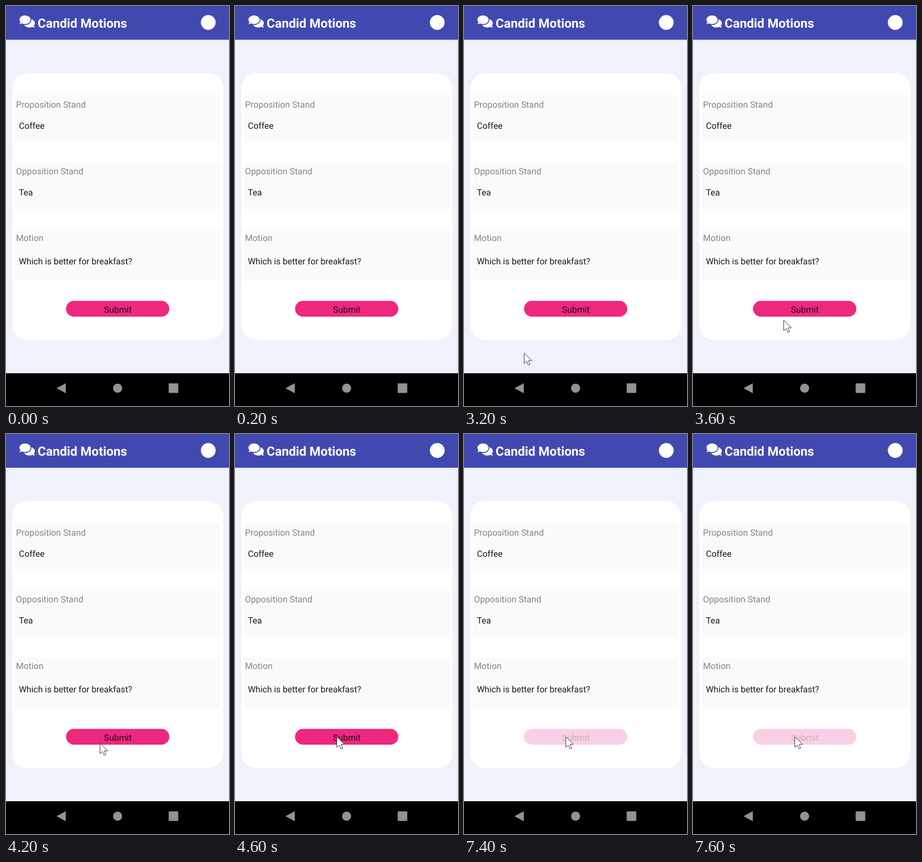
An HTML page with a canvas that plays this animation: 402 by 720 pixels, repeating every 8 s.

```html
<!DOCTYPE html>
<html lang="en">
<head>
<meta charset="utf-8">
<title>Debate form</title>
<style>
  html, body { margin: 0; width: 100%; height: 100%; overflow: hidden; background: #f0f2fb; }
  canvas { display: block; width: 402px; height: 720px; }
</style>
</head>
<body>
<canvas id="stage"></canvas>
<script>
const W = 402, H = 720, LOOP = 8000, PRESS = 7400;
const canvas = document.getElementById('stage');
const ctx = canvas.getContext('2d');
const dpr = window.devicePixelRatio || 1;
canvas.width = W * dpr;
canvas.height = H * dpr;

// Pointer positions: [start ms, x, y], each held until the next
const pointer = [
  [2800, 163, 673], [3000, 112, 658], [3200, 108, 624], [3400, 136, 592],
  [3600, 163, 565], [4000, 175, 559], [4200, 169, 556], [4400, 182, 546],
  [4600, 183, 544.5]
];

const fields = [
  { top: 160, height: 86, label: 'Proposition Stand', labelY: 183.3, value: 'Coffee', valueY: 221 },
  { top: 282, height: 84, label: 'Opposition Stand', labelY: 303.3, value: 'Tea', valueY: 341 },
  { top: 402, height: 92, label: 'Motion', labelY: 423.3, value: 'Which is better for breakfast?', valueY: 465 }
];

function rect(x, y, w, h, color, r = 0) {
  ctx.fillStyle = color;
  ctx.beginPath();
  ctx.roundRect(x, y, w, h, r);
  ctx.fill();
}

function disc(x, y, r, color) {
  ctx.fillStyle = color;
  ctx.beginPath();
  ctx.arc(x, y, r, 0, Math.PI * 2);
  ctx.fill();
}

function poly(points, color) {
  ctx.fillStyle = color;
  ctx.beginPath();
  points.forEach(([x, y]) => ctx.lineTo(x, y));
  ctx.closePath();
  ctx.fill();
}

function text(str, x, y, color, size, weight = 400, align = 'left') {
  ctx.font = `${weight} ${size}px Roboto, sans-serif`;
  ctx.textRendering = 'geometricPrecision';
  ctx.textAlign = align;
  ctx.fillStyle = color;
  ctx.fillText(str, x, y);
}

// Speech bubble with its tail at the left, or at the right when side is -1
function bubble(x, y, side) {
  ctx.save();
  ctx.translate(x, y);
  ctx.scale(side, 1);
  ctx.fillStyle = '#fff';
  ctx.beginPath();
  ctx.ellipse(0, 0, 10.1, 7.8, 0, 0, Math.PI * 2);
  ctx.fill();
  ctx.beginPath();
  ctx.moveTo(-8.2, 4.4);
  ctx.quadraticCurveTo(-8.9, 6, -10, 7.1);
  ctx.quadraticCurveTo(-10.1, 7.8, -9.7, 7.8);
  ctx.quadraticCurveTo(-7.4, 7.7, -5.4, 6.5);
  ctx.fill();
  ctx.restore();
}

function drawHeader() {
  const blue = '#4149b1';
  rect(0, 0, W, 60.8, blue);
  bubble(42, 31, -1);
  ctx.fillStyle = blue;
  ctx.beginPath();
  ctx.ellipse(34.3, 24.8, 11.6, 9.3, 0, 0, Math.PI * 2);
  ctx.fill();
  bubble(34.3, 24.8, 1);
  text('Candid Motions', 57, 39, '#fff', 22.8, 700);
  disc(364.6, 29.6, 13.3, '#fff');
}

function drawForm(pressed) {
  rect(11.5, 121, 380, 480, '#fff', 26);
  for (const f of fields) {
    rect(16, f.top, 370.5, f.height, '#fafafa', 2);
    text(f.label, 18, f.labelY, '#858585', 15.85);
    text(f.value, 23.2, f.valueY, '#1c1c1c', 15.65);
  }
  rect(108.2, 530.8, 186.2, 28.4, pressed ? '#f9d0e3' : '#ee287e', 14.2);
  text('Submit', 201.6, 551.7, pressed ? '#c6b0bc' : '#200a14', 15.85, 400, 'center');
}

function drawNav() {
  const grey = '#939393';
  rect(0, 661, W, 59, '#000');
  poly([[91, 688], [107.8, 679], [107.8, 697]], grey);
  disc(201.2, 688, 8.2, grey);
  rect(293.3, 679.3, 17.2, 17.2, grey, 1);
}

function drawPointer(x, y) {
  ctx.save();
  ctx.translate(x + 0.5, y + 0.5);
  poly([[0, 0], [0, 19], [4.4, 15], [7.5, 21.8], [10.6, 20.4], [7.7, 13.9], [13.8, 13.7]], '#fff');
  ctx.strokeStyle = '#26262c';
  ctx.lineWidth = 0.9;
  ctx.stroke();
  ctx.restore();
}

function draw(t) {
  ctx.setTransform(dpr, 0, 0, dpr, 0, 0);
  rect(0, 0, W, H, '#f0f2fb');
  drawHeader();
  drawForm(t >= PRESS);
  drawNav();
  const spot = pointer.filter(p => p[0] <= t).pop();
  if (spot) drawPointer(spot[1], spot[2]);
}

const start = performance.now();
function tick() {
  draw((performance.now() - start) % LOOP);
  requestAnimationFrame(tick);
}
tick();
</script>
</body>
</html>
```
